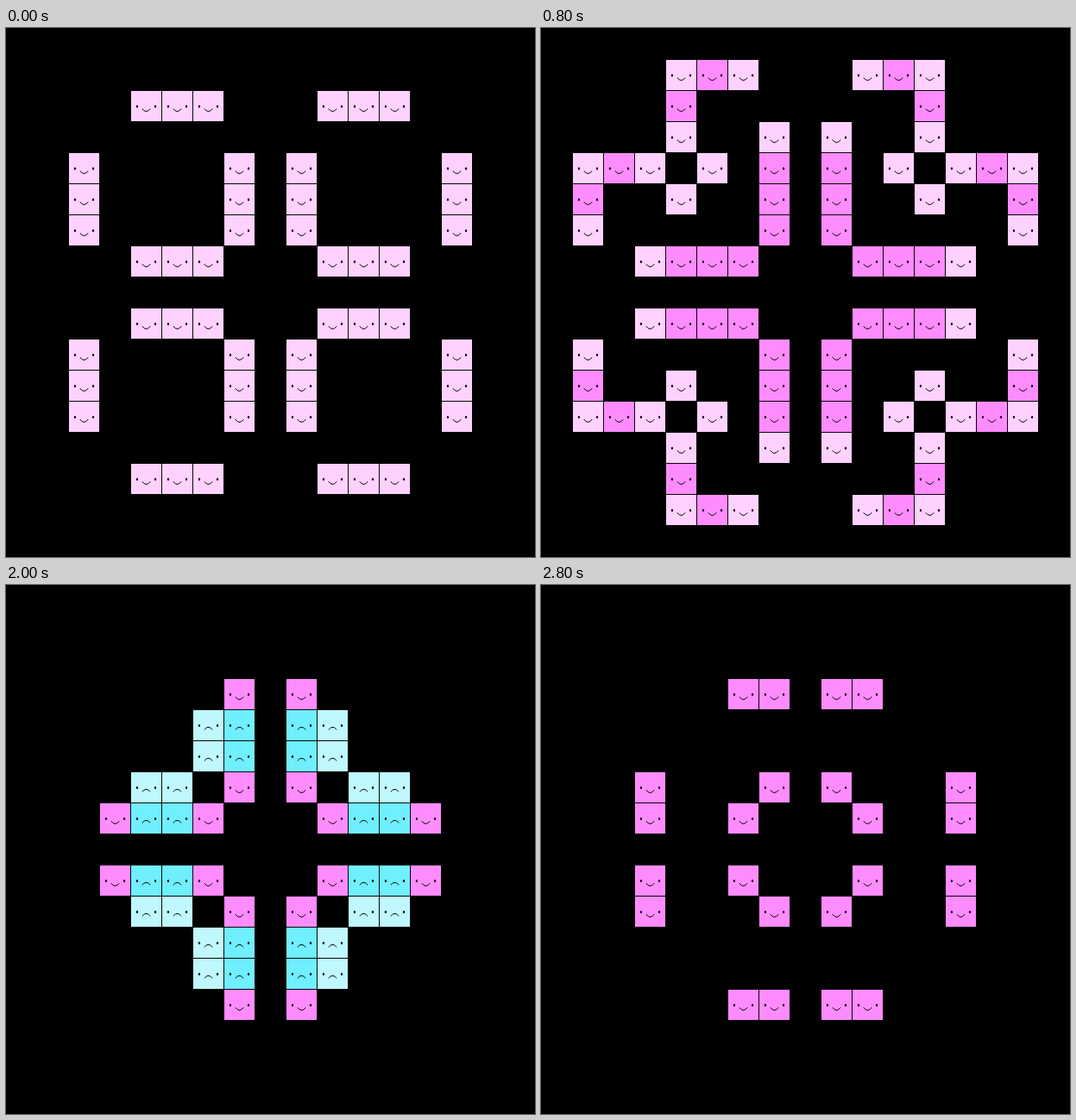
Write an HTML page with a canvas that moves like this. It is 630 by 630 pixels and loops after 4000 ms.

```html
<!DOCTYPE html>
<html>
<head>
<meta charset="utf-8">
<style>
html, body { margin: 0; height: 100%; overflow: hidden; background: #000; }
canvas { display: block; }
</style>
</head>
<body>
<canvas width="630" height="630"></canvas>
<script>
const ctx = document.querySelector('canvas').getContext('2d');
const N = 17, PITCH = 37, SIZE = 36, STEP = 400, LOOP = 4000, LAST = 7;
const indices = [...Array(N * N).keys()];

// Cellular automaton on a torus: born with 3 neighbours, survives with 1 to 3.
function neighbours(grid, i) {
  const x = i % N, y = Math.floor(i / N);
  let count = 0;
  for (let dy = -1; dy <= 1; dy++)
    for (let dx = -1; dx <= 1; dx++)
      if (dx || dy) count += grid[(y + dy + N) % N * N + (x + dx + N) % N];
  return count;
}

function evolve(grid) {
  return grid.map((alive, i) => {
    const n = neighbours(grid, i);
    return +(n === 3 || (alive && (n === 1 || n === 2)));
  });
}

function seed(i) {
  const fold = v => Math.min(v, N - 1 - v);
  const x = fold(i % N), y = fold(Math.floor(i / N));
  const bar = (a, b) => (a === 2 || a === 7) && b >= 4 && b <= 6;
  return +(bar(x, y) || bar(y, x));
}

const generations = [indices.map(seed)];
while (generations.length < LAST + 2) generations.push(evolve(generations.at(-1)));

function drawCell(x, y, old, happy) {
  ctx.save();
  ctx.translate(x, y);
  ctx.fillStyle = happy ? (old ? '#ff8cff' : '#ffd1ff') : (old ? '#70efff' : '#bff8ff');
  ctx.fillRect(0, 0, SIZE, SIZE);
  ctx.fillStyle = '#000';
  for (const eye of [7.2, 28.8]) {
    ctx.beginPath();
    ctx.ellipse(eye, 18.4, 1.1, 1.6, 0, 0, 2 * Math.PI);
    ctx.fill();
  }
  const [ends, bend] = happy ? [21.2, 27.6] : [23.3, 17.3];
  ctx.beginPath();
  ctx.moveTo(13.2, ends);
  ctx.quadraticCurveTo(18, bend, 22.8, ends);
  ctx.stroke();
  ctx.restore();
}

function draw(now) {
  const g = Math.min(LAST, Math.floor(now % LOOP / STEP));
  const before = generations[g - 1], after = generations[g + 1];
  ctx.clearRect(0, 0, 630, 630);
  generations[g].forEach((alive, i) => {
    if (alive) drawCell(1 + i % N * PITCH, 1 + Math.floor(i / N) * PITCH, before && before[i], after[i]);
  });
  requestAnimationFrame(draw);
}
requestAnimationFrame(draw);
</script>
</body>
</html>
```
